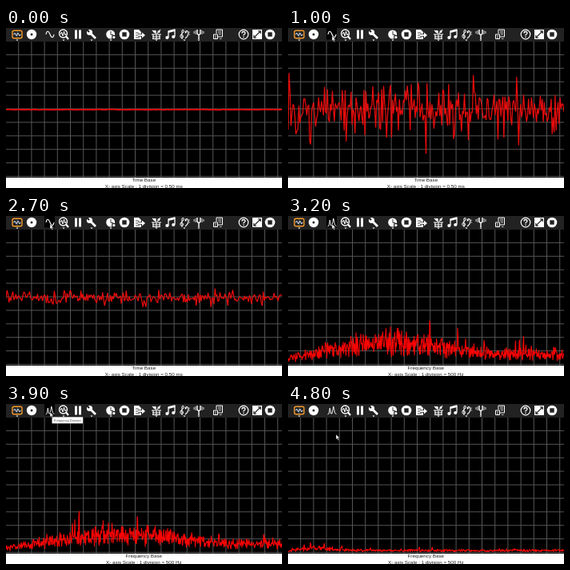
Recreate the animation shown at these times as an HTML page with a canvas. Size 345 by 200 pixels, loop 4.9 s.

```html
<!DOCTYPE html>
<html>
<head>
<meta charset="utf-8">
<style>
html, body { margin: 0; width: 100%; height: 100%; overflow: hidden; background: #fff; }
canvas { display: block; width: 345px; height: 200px; }
</style>
</head>
<body>
<canvas id="scope" width="345" height="200"></canvas>
<script>
const ctx = document.getElementById('scope').getContext('2d');
const W = 345, TOP = 17, BASE = 187, MID = 102;
const LOOP = 4900, STEP = 100, SWITCH = 3000;
const BAR = '#222';
const FONT = '"Liberation Sans", Arial, sans-serif';

function rand(a, b) {
  let h = Math.imul(a + 17, 374761393) ^ Math.imul(b + 29, 668265263);
  h = Math.imul(h ^ (h >>> 13), 1274126177);
  h = Math.imul(h ^ (h >>> 15), 2246822519);
  return ((h ^ (h >>> 16)) >>> 0) / 4294967296;
}
const mix = (a, b, k) => a + (b - a) * k;
const ramp = (t, from, to) => Math.max(0, Math.min(1, (t - from) / (to - from)));
const ease = (t, from, to) => { const k = ramp(t, from, to); return k * k * (3 - 2 * k); };
const bell = d => Math.exp(-d * d);

function rect(x, y, w, h, color = '#fff') { ctx.fillStyle = color; ctx.fillRect(x, y, w, h); }
function disc(x, y, r, color = '#fff') {
  ctx.fillStyle = color;
  ctx.beginPath(); ctx.arc(x, y, r, 0, 7); ctx.fill();
}
function ring(x, y, r, width) {
  ctx.strokeStyle = '#fff'; ctx.lineWidth = width;
  ctx.beginPath(); ctx.arc(x, y, r, 0, 7); ctx.stroke();
}
function line(d, width = 1, color = '#fff') {
  ctx.strokeStyle = color; ctx.lineWidth = width; ctx.lineJoin = 'round';
  ctx.stroke(new Path2D(d));
}
function shape(d, color = '#fff') { ctx.fillStyle = color; ctx.fill(new Path2D(d)); }
function text(s, x, y, size, color) {
  ctx.font = `${size}px ${FONT}`;
  ctx.textAlign = 'center'; ctx.fillStyle = color;
  ctx.fillText(s, x, y);
}
function at(x, y, draw) { ctx.save(); ctx.translate(x, y); draw(); ctx.restore(); }

// Icons are drawn around their own centre.
function scopeIcon() {
  ctx.strokeStyle = '#f39a2c'; ctx.lineWidth = 1.4;
  ctx.beginPath(); ctx.roundRect(-6, -4.7, 12, 9.5, 2); ctx.stroke();
  line('M-5 0H5M0 -4V4', .6, '#777');
  line('M-4.5 0L-3 -2L-1 2L1 -2L3 2L4.5 0', .9, '#cfe3f5');
}
function recordIcon() { disc(0, 0, 6.2); disc(0, 0, 1.5, BAR); }
function sineIcon() { line('M-5 0C-4 -5 -2 -5 0 0S4 5 5 0', 1.1); }
function peaksIcon() { line('M-5.5 5L-3.8 4L-2.7 -3L-1.3 4H0L1.8 -5L3.5 3L5.5 5', .9); }
function zoomIcon() {
  ring(-.5, -1, 5, 1.3);
  line('M3 2.5L6 6', 2.2);
  line('M-4 0L-2.5 -3L-1 2L.5 -4L2 1L3.5 -1');
}
function pauseIcon() { rect(-4, -5.5, 3, 11); rect(1, -5.5, 3, 11); }
function wrenchIcon() {
  line('M-1 -1L5 5', 2.8);
  disc(-2.5, -2.5, 3.6);
  line('M-6 -6L-3 -3', 2.2, BAR);
}
function timerIcon() {
  disc(-.3, 0, 5.5);
  line('M0 -4V.5H3', .9, BAR);
  disc(3.8, 3.6, 2.8, BAR); disc(3.8, 3.6, 1.7);
}
function stopIcon() { disc(0, 0, 6.3); rect(-2.7, -2.7, 5.4, 5.4, BAR); }
function exportIcon() {
  shape('M-6 -6H0L3 -3V6H-6Z');
  line('M-4 -2H0M-4 1H-1M-4 4H1', .8, BAR);
  line('M-1 1H4', 3.4, BAR);
  line('M-1 1H5', 1.8);
  shape('M4 -2.5L8 1L4 4.5Z');
}
function instrumentsIcon() {
  line('M-6 0H6M-5 3H5M-5 5.5H5M-4 0V5M0 0V5M4 0V5', 1.1);
  line('M-5 -5L0 -1M5 -6L1 -1', 1.2);
  disc(-2, -3.5, 1.8); disc(3, -3.5, 1.5);
}
function notesIcon() {
  line('M-3 4V-4L5 -6V2.5', 1.3);
  line('M-3 -3L5 -5', 2.2);
  disc(-4.6, 4, 2.1); disc(3.3, 3, 2.1);
}
function clefsIcon() {
  line('M-3 6V-5Q0 -7 -1 -3L-5 1Q-6 5 -2 4Q0 1 -4 1');
  line('M1 -3Q4 -6 5 -2Q5 2 1 5', 1.2);
  disc(1.7, -2.5, 1.1); disc(6.5, -3, .6); disc(6.5, 0, .6);
}
function forkIcon() {
  line('M-2 -6V-1Q0 2 2 -1V-6M0 0V6', 1.4);
  line('M-4 -5V0M4 -5V0M-6 -4V-1M6 -4V-1', .8);
}
function pagesIcon() {
  line('M-2 -6H5.5V3H-2Z');
  line('M0 -4H4M0 -2H4M1 0H4', .7);
  rect(-6.5, -1, 6.5, 7.5, BAR);
  line('M-5.5 0H-.5V5.5H-5.5Z');
  line('M-4 2H-2M-4 4H-2M2 5.5H4.5', .7);
}
function helpIcon() {
  ring(0, 0, 5.8, 1.2);
  line('M-2 -1.5Q-2 -3.5 0 -3.5Q2.2 -3.3 2 -1.5Q1.5 -.3 0 .5V1.5', 1.3);
  disc(0, 3.3, .8);
}
function expandIcon() {
  rect(-6, -6, 12, 12);
  line('M-4 4L4 -4M1 -4.2H4.2V-1M-1 4.2H-4.2V1', 1.1, BAR);
}

const buttons = [
  { x: 14, draw: scopeIcon, menu: true }, { x: 32, draw: recordIcon },
  { x: 72, draw: zoomIcon, menu: true }, { x: 90, draw: pauseIcon },
  { x: 107, draw: wrenchIcon, menu: true }, { x: 131, draw: timerIcon, menu: true },
  { x: 148, draw: stopIcon }, { x: 166, draw: exportIcon },
  { x: 188, draw: instrumentsIcon, menu: true }, { x: 206, draw: notesIcon },
  { x: 223, draw: clefsIcon, menu: true }, { x: 241, draw: forkIcon, menu: true },
  { x: 265, draw: pagesIcon }, { x: 297, draw: helpIcon },
  { x: 314, draw: expandIcon }, { x: 330, draw: stopIcon }
];

function toolbar(t, spectrum) {
  rect(0, 0, W, TOP, BAR);
  if (t >= 500 && t < 4100) rect(48, 0, 13, 14.5, '#000');
  for (const { x, draw, menu } of buttons) {
    at(x, 8, draw);
    if (menu) shape(`M${x - 1.5} 14.6H${x + 1.5}L${x} 16.3Z`);
  }
  at(55, 8, spectrum ? peaksIcon : sineIcon);
}

function grid() {
  rect(0, TOP, W, BASE - TOP, '#000');
  for (let x = 15.2; x < W; x += 16.2) rect(x, TOP, 1, BASE - TOP, '#555');
  for (let y = TOP + 15.9; y < BASE; y += 16.9) rect(0, y, W, 1, '#555');
}

function trace(count, pointAt, width, color) {
  ctx.save();
  ctx.beginPath(); ctx.rect(0, TOP, W, BASE - TOP); ctx.clip();
  ctx.strokeStyle = color; ctx.lineWidth = width; ctx.lineJoin = 'bevel';
  ctx.beginPath();
  for (let i = 0; i <= count; i++) ctx.lineTo(i * W / count, pointAt(i));
  ctx.stroke();
  ctx.restore();
}

// Near silence, then a loud burst that settles to a murmur.
function waveform(t, seed) {
  const burst = ease(t, 600, 900) * (1 - ease(t, 1200, 1800));
  const amp = mix(.2, 4, ramp(t, 600, 900)) + 11 * burst;
  trace(280, i => {
    const n = rand(seed, i) + rand(seed, i + 400) + rand(seed, i + 800) - 1.5;
    const swell = .7 + .7 * rand(seed, 2000 + (i >> 2));
    return MID + amp * 2 * n * swell;
  }, amp < 1 ? 1.8 : 1.25, '#e80c0c');
}

// A noise floor with a broad hump; it decays and the hump ends in the low range.
function spectrumTrace(t, seed) {
  const fall = ease(t, 4300, 4800);
  const level = Math.exp(-1.7 * ramp(t, 3600, 4800)) * mix(.65, 1, ramp(t, 3000, 3500));
  const center = 125 + 55 * ease(t, 3600, 4300) - 150 * fall;
  const spread = mix(85, 32, fall);
  trace(690, i => {
    const x = i / 2;
    const body = level * (16 + 20 * bell((x - center) / spread)) * (.55 + .45 * ramp(x, 0, 45));
    const grain = .3 + .7 * (rand(seed, i) + rand(seed, i + 1000));
    const spike = 1.5 * rand(seed, 3000 + (i >> 1)) ** 30;
    return BASE - 1 - body * (grain + spike);
  }, 1.1, '#f80404');
}

function tooltip(label, width) {
  rect(57.5, 16.3, width, 8, '#fafafa');
  text(label, 57.5 + width / 2, 21.7, 4, '#555');
}

function cursor(t) {
  if (t < 300) return;
  const away = 1 - ease(t, 300, 500) + ease(t, 4000, 4200);
  at(mix(55, 60, away), mix(10, 38, away), () => {
    const arrow = 'M0 0V6.3L1.5 5L2.6 7.4L3.7 6.9L2.6 4.6H4.6Z';
    shape(arrow);
    line(arrow, .45, '#111');
  });
}

function render(time) {
  const step = Math.floor((time % LOOP) / STEP);
  const t = step * STEP;
  const seed = t === 2100 ? step - 1 : step; // the trace holds for one beat here
  const spectrum = t >= SWITCH;
  rect(0, 0, W, 200);
  grid();
  (spectrum ? spectrumTrace : waveform)(t, seed);
  toolbar(t, spectrum);
  text(spectrum ? 'Frequency Base' : 'Time Base', 172.3, 192.2, 6.25, '#222');
  text('X- axis Scale : 1 division = ' + (spectrum ? '500 Hz' : '0.50 ms'), 172.3, 199.5, 6.25, '#222');
  if (t >= 1500 && t < 2500) tooltip('Time Domain', 28.5);
  if (t >= 3400 && t < 4100) tooltip('Frequency Domain', 38.5);
  cursor(t);
}

const start = performance.now();
function tick() {
  render(performance.now() - start);
  requestAnimationFrame(tick);
}
tick();
</script>
</body>
</html>
```
